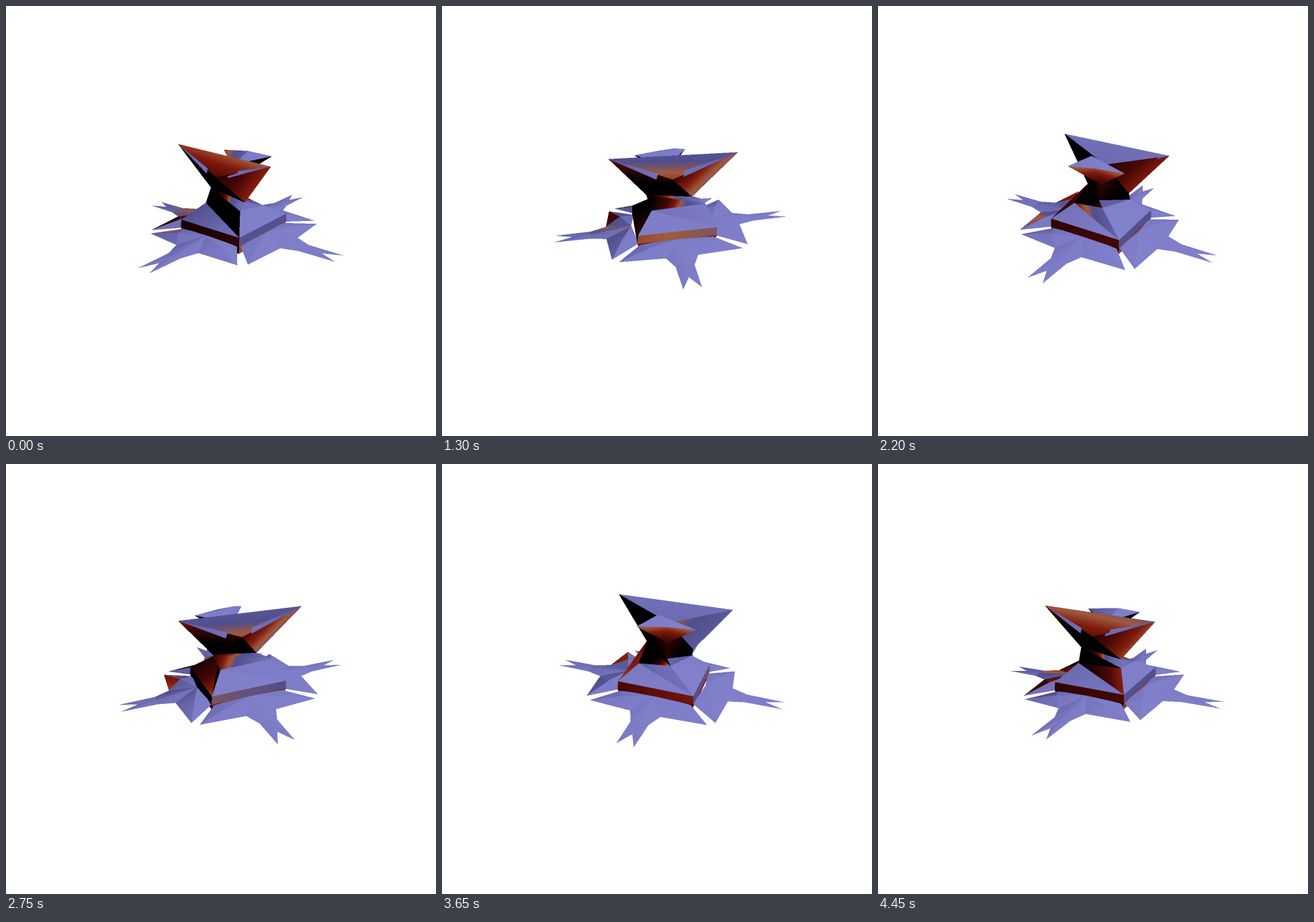
Write an HTML page with a canvas that moves like this. It is 640x640 px and loops after 4500 ms.

```html
<!DOCTYPE html>
<html lang="en">
<head>
<meta charset="utf-8">
<title>Turning figure</title>
<style>
html, body { margin: 0; width: 100%; height: 100%; overflow: hidden; background: #fff; }
canvas { display: block; width: 640px; height: 640px; }
</style>
</head>
<body>
<canvas id="stage" width="640" height="640"></canvas>
<script>
const PERIOD = 1500, STEP = 50;
const DIST = 694, SIN = 0.435, COS = 0.9, OFFSET = 17, AXIS_Y = 327;
const EYE = [-OFFSET, DIST * SIN, DIST * COS];
const LIGHT = [0.5, 0.72, 0.48];
const RAMP = [
  [0.24, 0, 0, 0], [0.34, 70, 8, 5], [0.38, 128, 26, 12], [0.41, 160, 90, 60],
  [0.44, 80, 78, 140], [0.55, 108, 107, 178], [0.75, 124, 123, 197], [1, 130, 129, 204]
];
const BOX = { x: 150, y: 170, w: 380, h: 280 }, SS = 2;
const W = BOX.w * SS, H = BOX.h * SS;
const rad = d => d * Math.PI / 180;

// Vertices are [x, height, z]; z points to the viewer.
const polar = (deg, r, h) => [r * Math.cos(rad(deg)), h, r * Math.sin(rad(deg))];

// The lower body leans a little against the turning axis.
const along = rad(41.3);
function lean([x, h, z]) {
  const u = x * Math.cos(along) + z * Math.sin(along);
  const v = z * Math.cos(along) - x * Math.sin(along);
  const u2 = u + 4.5, v2 = v + 2;
  return [
    u2 * Math.cos(along) - v2 * Math.sin(along),
    h + 0.065 * u + 0.018 * v,
    u2 * Math.sin(along) + v2 * Math.cos(along)
  ];
}

// Brightness of a corner is its base plus gain times the light on it.
const faces = [];
function face(pts, opt = {}) {
  for (let i = 2; i < pts.length; i++) {
    faces.push({
      pts: [pts[0], pts[i - 1], pts[i]],
      round: 0.15, base: [0, 0, 0], gain: 1, lift: 0, ...opt
    });
  }
}
const shade = (pts, ...base) => face(pts, { base, gain: 0 });
const level = v => [v, v, v];

const neckA = polar(62, 34, 50), neckB = polar(205, 35, 55), throat = polar(300, 28, 52);

function addBody() {
  const ring = (r, h) => [0, 1, 2, 3].map(i => lean(polar(86.3 + 90 * i, r, h)));
  const foot = ring(73, -9), low = ring(78, 5), high = ring(77, 17);
  const top = [polar(82, 60, 50), polar(177, 39, 38), polar(290, 28, 41), polar(12, 44, 37)];
  const band = { base: level(0.27), gain: 0.25 };
  for (let i = 0; i < 4; i++) {
    const j = (i + 1) % 4;
    face([foot[i], foot[j], low[j], low[i]], band);
    face([low[i], low[j], high[j], high[i]], band);
    face([high[i], high[j], top[j], top[i]]);
  }
  const lid = { base: level(-0.33), round: 0.4 };
  face([top[0], top[1], neckB, neckA], lid);
  face([top[1], top[2], throat, neckB], lid);
  face([top[2], top[3], neckA, throat], lid);
  face([top[3], top[0], neckA], lid);
}

function addArm(deg) {
  const c = Math.cos(rad(deg)), s = Math.sin(rad(deg));
  const at = (r, t, h) => lean([r * c - t * s, h, r * s + t * c]);
  const opt = { round: 0.2, flat: true };
  const mid = at(60, 0, 8), notch = at(147, 0, 0), wrist = at(120, 0, 1);
  for (const m of [1, -1]) {
    const root = at(53, 50 * m, 3), fold = at(75, 40 * m, 7), spike = at(91, 82 * m, 0);
    const pit = at(97, 21 * m, 1), neck = at(120, 12 * m, 0), tip = at(172, 11 * m, 0);
    face([root, spike, fold], opt);
    face([fold, spike, pit], opt);
    face([mid, root, fold, pit], opt);
    face([mid, pit, neck, wrist], opt);
    face([wrist, neck, tip, notch], opt);
  }
}

function addHead() {
  const earA = polar(62.2, 94, 120), earB = polar(205.2, 88, 114);
  const back = polar(132, 36, 86), core = [0, 95, 0];
  const whiskA = polar(343.6, 58, 102), whiskB = polar(257, 57, 100);
  const brow = polar(336, 23, 112), lip = polar(300, 43, 103), jaw = polar(300, 18, 72);

  face([earA, earB, back], { base: [0.39, 0.39, 0.33], gain: 0.1 });
  face([earA, back, neckA], { base: [0.39, 0.3, 0.39], gain: 0.1 });
  face([earB, back, neckB], { base: [0.37, 0.28, 0.15], gain: 0.1 });
  face([back, neckA, neckB], { base: level(-0.05) });

  // Pale slits along the back of the ears
  const slit = (ear, deg, r, h) => face(
    [ear, polar(deg, r, h), polar(deg + 3, r + 1, h - 8)],
    { base: [0.45, 0.65, 0.58], gain: 0, lift: 0.012 });
  slit(earA, 101, 33, 95);
  slit(earB, 163, 37, 93);

  shade([earA, earB, core], 0.6, 0.6, 0.55);
  face([earA, core, neckA], { base: level(0.08) });
  face([earB, core, neckB], { base: level(-0.06) });

  const plate = { round: 0.1, base: level(0.05) };
  for (const [whisk, neck] of [[whiskA, neckA], [whiskB, neckB]]) {
    face([whisk, brow, core], plate);
    face([whisk, brow, lip], plate);
    shade([whisk, lip, jaw], 0.42, 0.4, 0.32);
    face([whisk, core, jaw], { base: level(-0.05) });
    shade([jaw, core, neck], 0.32, 0.28, 0.22);
    shade([jaw, throat, neck], 0.3, 0.28, 0.2);
  }
}

addBody();
[311.3, 41.3, 131.5, 221.3].forEach(addArm);
addHead();

const dot = (a, b) => a[0] * b[0] + a[1] * b[1] + a[2] * b[2];
const sub = (a, b) => a.map((v, i) => v - b[i]);
const unit = a => { const n = Math.hypot(...a) || 1; return a.map(v => v / n); };
const cross = (a, b) => [
  a[1] * b[2] - a[2] * b[1], a[2] * b[0] - a[0] * b[2], a[0] * b[1] - a[1] * b[0]
];

// Colours of the light ramp, one packed pixel per step
const PALETTE = Uint32Array.from({ length: 513 }, (_, n) => {
  const v = n / 512;
  const i = Math.max(1, RAMP.findIndex(r => r[0] >= v));
  const a = RAMP[i - 1], b = RAMP[i];
  const k = Math.max(0, (v - a[0]) / (b[0] - a[0]));
  const [r, g, bl] = [1, 2, 3].map(c => Math.round(a[c] + (b[c] - a[c]) * k));
  return (255 << 24 | bl << 16 | g << 8 | r) >>> 0;
});

const ctx = document.getElementById('stage').getContext('2d');
const layer = document.createElement('canvas');
layer.width = W;
layer.height = H;
const layerCtx = layer.getContext('2d');
const image = layerCtx.createImageData(W, H);
const pixels = new Uint32Array(image.data.buffer);
const depth = new Float32Array(W * H);

function project([x, h, z]) {
  const s = DIST / (DIST - COS * z - SIN * h);
  return {
    x: (320 + s * (OFFSET + x) - BOX.x) * SS,
    y: (AXIS_Y + s * (SIN * z - COS * h) - BOX.y) * SS,
    s
  };
}

function light(f, pts) {
  let n = unit(cross(sub(pts[1], pts[0]), sub(pts[2], pts[0])));
  const side = f.flat ? n[1] : dot(n, sub(EYE, pts[0]));
  if (side < 0) n = n.map(v => -v);
  return pts.map((p, i) => {
    const out = unit([p[0], 0, p[2]]);
    const bent = unit(n.map((v, k) => v + f.round * out[k]));
    return f.base[i] + f.gain * dot(bent, LIGHT);
  });
}

function fill([a, b, c], v, lift) {
  const area = (b.x - a.x) * (c.y - a.y) - (b.y - a.y) * (c.x - a.x);
  if (Math.abs(area) < 0.01) return;
  const low = k => Math.max(0, Math.floor(Math.min(a[k], b[k], c[k])));
  const high = (k, max) => Math.min(max - 1, Math.ceil(Math.max(a[k], b[k], c[k])));
  const x0 = low('x'), x1 = high('x', W), y0 = low('y'), y1 = high('y', H);
  for (let y = y0; y <= y1; y++) {
    for (let x = x0; x <= x1; x++) {
      const px = x + 0.5, py = y + 0.5;
      const i = ((b.x - px) * (c.y - py) - (b.y - py) * (c.x - px)) / area;
      const j = ((c.x - px) * (a.y - py) - (c.y - py) * (a.x - px)) / area;
      const k = 1 - i - j;
      if (i < 0 || j < 0 || k < 0) continue;
      const s = i * a.s + j * b.s + k * c.s + lift, at = y * W + x;
      if (s <= depth[at]) continue;
      depth[at] = s;
      const value = i * v[0] + j * v[1] + k * v[2];
      pixels[at] = PALETTE[Math.round(512 * Math.min(1, Math.max(0, value)))];
    }
  }
}

function render(turn) {
  const c = Math.cos(turn), s = Math.sin(turn);
  pixels.fill(0xffffffff);
  depth.fill(0);
  for (const f of faces) {
    const pts = f.pts.map(([x, h, z]) => [x * c - z * s, h, x * s + z * c]);
    fill(pts.map(project), light(f, pts), f.lift);
  }
  layerCtx.putImageData(image, 0, 0);
  ctx.fillStyle = '#fff';
  ctx.fillRect(0, 0, 640, 640);
  ctx.drawImage(layer, BOX.x, BOX.y, BOX.w, BOX.h);
}

let shown = -1;
const start = performance.now();
function tick(now) {
  const step = Math.floor(Math.max(0, now - start) % PERIOD / STEP);
  if (step !== shown) {
    shown = step;
    render(step * STEP / PERIOD * 2 * Math.PI);
  }
  requestAnimationFrame(tick);
}
tick(start);
</script>
</body>
</html>
```
